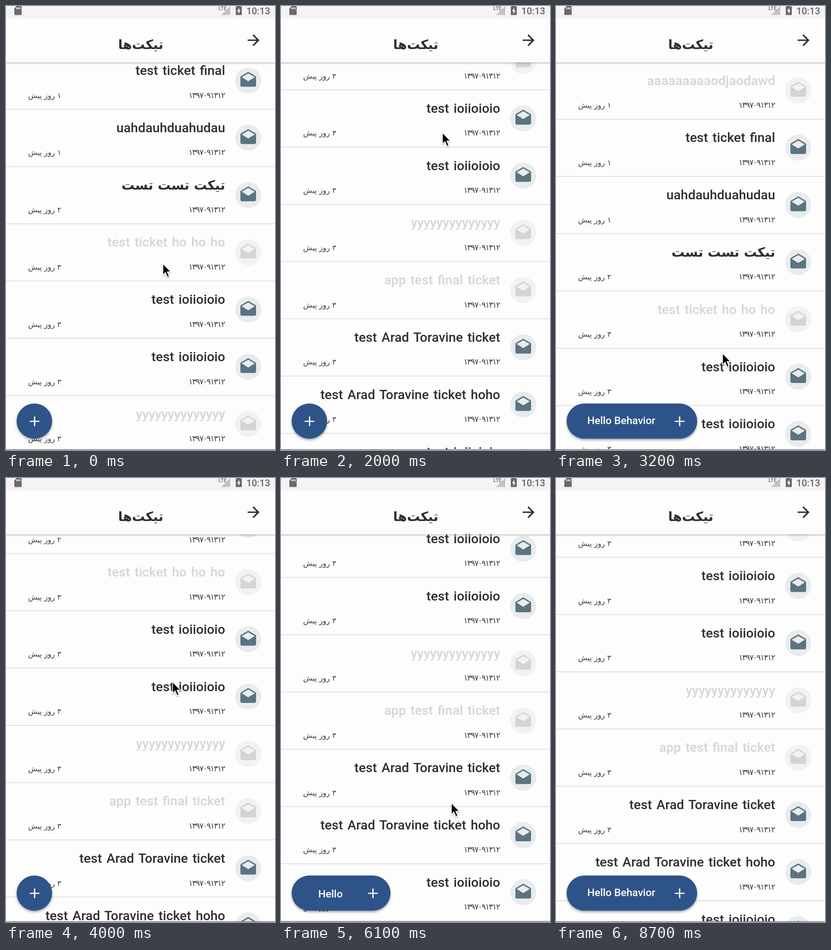
Recreate the animation shown at these times as an HTML page. Size 583 by 960 pixels, loop 8800 ms.

```html
<!DOCTYPE html>
<html lang="fa">
<head>
<meta charset="utf-8">
<title>Tickets</title>
<style>
html, body { margin: 0; width: 100%; height: 100%; overflow: hidden; background: #fefdfe; }
svg { display: block; width: 100%; height: 100%; }
text { font-family: Roboto, "DejaVu Sans", sans-serif; }
.title { font-size: 28.4px; font-weight: 500; word-spacing: 2.8px; text-anchor: end; fill: #2f2d30; }
.fa { font-family: "DejaVu Sans", sans-serif; font-size: 28px; font-weight: 700; word-spacing: 0; }
.read .title { fill: #d6d4d7; }
.date { font: 17px "DejaVu Sans", sans-serif; letter-spacing: -1.3px; text-anchor: end; fill: #3c3a3d; }
.day { font: 16px "DejaVu Sans", sans-serif; direction: rtl; text-anchor: end; fill: #3c3a3d; }
.disc { fill: #e9ebed; }
.mail { fill: #5a7481; }
.read .disc { fill: #f2f1f3; }
.read .mail { fill: #d4d3d5; }
#label { font-size: 22.7px; font-weight: 500; text-anchor: middle; fill: #fff; }
</style>
</head>
<body>
<svg viewBox="0 0 583 960" preserveAspectRatio="none">
  <defs>
    <path id="mail" d="M22 8c0-.7-.4-1.300-1-1.700L12 1 3 6.300C2.400 6.600 2 7.300 2 8v10c0 1.100.9 2 2 2h16c1.100 0 2-.9 2-2zM12 13L3.700 7.800 12 3l8.300 4.800z"/>
    <linearGradient id="shade" x2="0" y2="1">
      <stop offset="0" stop-color="#000" stop-opacity=".3"/>
      <stop offset=".4" stop-color="#000" stop-opacity=".1"/>
      <stop offset="1" stop-color="#000" stop-opacity="0"/>
    </linearGradient>
    <filter id="soft" x="-20%" y="-20%" width="140%" height="150%">
      <feDropShadow dx="0" dy="3" stdDeviation="2.5" flood-opacity=".35"/>
    </filter>
    <filter id="thin" x="-40%" y="-30%" width="200%" height="180%">
      <feDropShadow dx="0" dy="2" stdDeviation="1.5" flood-opacity=".35"/>
    </filter>
    <clipPath id="window"><rect id="slot" x="67" y="880" height="36"/></clipPath>
  </defs>

  <rect width="583" height="960" fill="#fefdfe"/>
  <g id="list"></g>
  <rect y="958.3" width="583" height="1.7" fill="#8b8a8c"/>

  <rect y="121.5" width="583" height="6" fill="url(#shade)"/>
  <rect width="583" height="122" fill="#fefdfe"/>
  <rect width="583" height="27" fill="#f5f3f5"/>
  <path fill="#6b696b" fill-rule="evenodd" d="M23 0H32Q34 0 34 2V17.5Q34 19.5 32 19.5H20Q18 19.5 18 17.5V5.5ZM22.5 3V7H24.500V3ZM26 3V7H28V3ZM29.5 3V7H31.5V3Z"/>
  <path fill="#c2c0c2" d="M486 0V19.5H466Z"/>
  <text x="460.5" y="8.5" font-size="11" font-weight="500" fill="#6b696b">LTE</text>
  <path fill="#666466" fill-rule="evenodd" d="M498 1H501V-1H507V1H511V19.5H498ZM505.5 3.5L500.5 11.5H503.7V17.5L508.5 9.5H505.5Z"/>
  <text x="521" y="17.8" font-size="20.3" font-weight="500" fill="#666466">10:13</text>
  <path transform="translate(517.3 54.8) scale(1.6)" fill="#2d2b2d" d="M12 4l-1.4 1.4L16.2 11H4v2h12.2l-5.6 5.6L12 20l8-8z"/>
  <text class="fa" x="292" y="93" text-anchor="middle" fill="#2f2d30">تیکت&zwnj;ها</text>

  <rect id="fab" x="23" y="859.5" height="76" rx="38" fill="#2e5288" filter="url(#soft)"/>
  <g clip-path="url(#window)"><text id="label"></text></g>
  <path id="plus" d="M-10.5 0H10.5M0 -10.5V10.5" stroke="#fff" stroke-width="2.7"/>
  <path id="cursor" filter="url(#thin)" fill="#000" stroke="#fff" stroke-width="1.5" d="M0 0V24.5L5.5 19.3L9.8 29.3L13.8 27.5L9.6 17.8H17.2Z"/>
</svg>
<script>
const $ = id => document.getElementById(id);
const LOOP = 8800, STEP = 100, ROW = 123.8, TOP = 121;

// [title, days ago, already read]
const io = "test ioiioioio";
const rows = [
  ["aaaaaaaaaodjaodawd", "۱", true],
  ["test ticket final", "۱"],
  ["uahdauhduahudau", "۱"],
  ["تیکت تست تست", "۲"],
  ["test ticket ho ho ho", "۳", true],
  [io, "۳"],
  [io, "۳"],
  ["yyyyyyyyyyyyyy", "۳", true],
  ["app test final ticket", "۳", true],
  ["test Arad Toravine ticket", "۳"],
  ["test Arad Toravine ticket hoho", "۳"],
  [io, "۳"],
  [io, "۳"],
  [io, "۳"]
];

$("list").innerHTML = rows.map(([title, days, read], i) => `
  <g class="${read ? "read" : ""}" transform="translate(0 ${TOP + i * ROW})">
    <text class="title ${title[0] > "z" ? "fa" : ""}" x="475" y="49.5">${title}</text>
    <text class="date" x="474" y="99">۱۳۹۷۰۹۱۳۱۲</text>
    <text class="day" x="48" y="99">${days} روز پیش</text>
    <circle class="disc" cx="525" cy="61.5" r="28.2"/>
    <use class="mail" href="#mail" transform="translate(504.6 41.1) scale(1.7)"/>
    <rect y="122.8" width="583" height="1.7" fill="#dddce0"/>
  </g>`).join("");

const lin = u => u;
const fling = u => 1 - (1 - u) ** 5;
const glide = u => u * u * (3 - 2 * u);

// [time, value, easing on the way there]
const scroll = [
  [1000, 145.3], [1400, 428.3], [2000, 558.7, fling],
  [2400, 558.7], [2900, 81.7], [3200, 0, fling],
  [3400, 0], [3650, 310], [4560, 466.5, fling],
  [5200, 466.5], [5500, 674.5], [5900, 765.5, fling],
  [6150, 619.3], [6600, 568.5, fling]
];
const cursorX = [
  [1000, 340], [1400, 350], [2400, 350], [2900, 361], [4500, 361],
  [4800, 354], [5200, 354], [5500, 360], [6150, 370], [6950, 370], [7400, 362]
];
const cursorY = [
  [1000, 557], [1400, 274], [2400, 274], [2900, 751], [3400, 751], [3650, 441],
  [4500, 441], [4800, 399, glide], [5200, 399], [5500, 191], [5550, 191],
  [5850, 586, glide], [5900, 586], [6150, 732], [6650, 732], [6800, 760, glide],
  [6950, 760], [7400, 1000, glide]
];
const fabWidth = [
  [2500, 77], [2800, 283], [3450, 283], [3700, 77], [5900, 77], [6200, 283]
];

function at(track, t) {
  const i = track.findIndex(k => k[0] > t);
  if (i === 0) return track[0][1];
  if (i < 0) return track[track.length - 1][1];
  const [t0, a] = track[i - 1], [t1, b, ease = lin] = track[i];
  return a + (b - a) * ease((t - t0) / (t1 - t0));
}

const move = (id, x, y) => $(id).setAttribute("transform", `translate(${x} ${y})`);

function draw(t) {
  move("list", 0, -at(scroll, t));
  move("cursor", at(cursorX, t), at(cursorY, t));

  const w = at(fabWidth, t), room = Math.max(0, w - 134), full = room > 148;
  $("fab").setAttribute("width", w);
  $("slot").setAttribute("width", room + (full ? 4 : 0));
  move("plus", w - 15, 898);
  move("label", 67 + room / 2, full ? 904 : 907);
  $("label").textContent = full ? "Hello Behavior" : "Hello";
}

const start = performance.now();
function tick() {
  const t = (performance.now() - start) % LOOP;
  draw(Math.floor(t / STEP) * STEP);
  requestAnimationFrame(tick);
}
draw(0);
requestAnimationFrame(tick);
</script>
</body>
</html>
```
